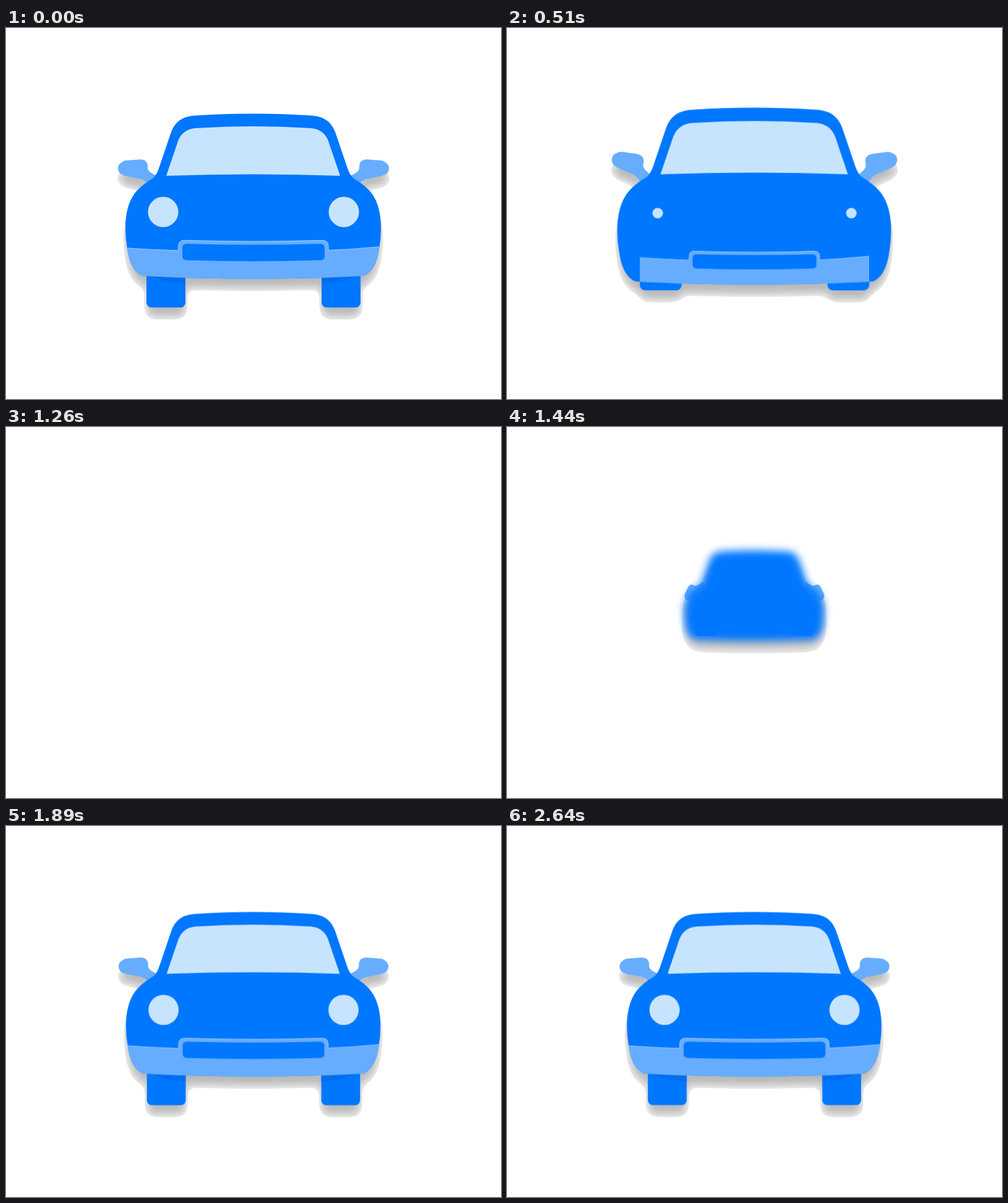
Recreate the animation shown at these times as an HTML page. Size 800 by 600 pixels, loop 2670 ms.

```html
<!DOCTYPE html>
<html lang="en">
<head>
<meta charset="utf-8">
<title>Car</title>
<style>
  html, body { margin: 0; width: 100%; height: 100%; overflow: hidden; background: #fff; }
  svg { display: block; width: 800px; height: 600px; }
</style>
</head>
<body>
<svg viewBox="0 0 800 600">
  <defs>
    <path id="shell" d="M399.5 138.5Q352 138.5 307 141.5C287 142.5 274 150 267 168L247 227Q243 239 236 244Q219 254 209 266C197 282 193 301 193 325Q193 341 196 357C199 380 208 397 222 401Q300 405.5 399.5 405.5Q499 405.5 577 401C591 397 600 380 603 357Q606 341 606 325C606 301 602 282 590 266Q580 254 563 244Q556 239 552 227L532 168C525 150 512 142.5 492 141.5Q447 138.5 399.5 138.5Z"/>
    <path id="mirror" d="M186 218Q190 214 196 214L217 212.5Q229 213 229 224Q228 231 236 235L252 244L234 256L226 249Q219 243 211 243L192 239Q181 236 181 227Q181 221 186 218Z"/>
    <g id="wheel">
      <rect x="227" y="380" width="63" height="72" rx="8"/>
      <path d="M234 400Q252 412 290 413V400Z" fill="#006eed"/>
    </g>
    <clipPath id="inside"><use href="#shell"/></clipPath>
    <filter id="soft" filterUnits="userSpaceOnUse" x="0" y="0" width="800" height="600" color-interpolation-filters="sRGB">
      <feGaussianBlur id="softBlur" stdDeviation="0"/>
    </filter>
    <filter id="shadow" filterUnits="userSpaceOnUse" x="0" y="0" width="800" height="600" color-interpolation-filters="sRGB">
      <feGaussianBlur in="SourceAlpha" stdDeviation="8"/>
      <feOffset dy="16"/>
      <feComponentTransfer result="cast"><feFuncA id="cut" type="table"/></feComponentTransfer>
      <feMerge><feMergeNode in="cast"/><feMergeNode in="SourceGraphic"/></feMerge>
    </filter>
  </defs>

  <g id="car" filter="url(#shadow)">
    <g id="scaled">
      <g fill="#66adff">
        <use id="mirrorL" href="#mirror"/>
        <g transform="matrix(-1 0 0 1 800 0)"><use id="mirrorR" href="#mirror"/></g>
      </g>
      <g id="wheels" fill="#07f">
        <use href="#wheel"/>
        <use href="#wheel" transform="matrix(-1 0 0 1 800 0)"/>
      </g>
      <use id="body" href="#shell" fill="#07f"/>
      <g clip-path="url(#inside)">
        <g id="bumper">
          <path fill="#66adff" stroke="#8bc1ff" stroke-width="1.3" d="M188 355.5Q232 358.5 278.5 360V354Q279 343 289 343.5Q400 347 510 343.5Q521 343 521 354V359.5Q566 357.5 612 353V415H188Z"/>
          <path id="grille" fill="#07f" d="M285 356Q285 349 292 349Q400 352 508 349Q515 349 515 356V369Q515 375.5 508 375.5Q400 379 292 375.5Q285 375 285 369Z"/>
        </g>
      </g>
      <path id="glass" fill="#c7e4ff" d="M259 239L278 183Q285 164 306 162Q400 156 493 162Q514 164 521 183L540 239Q400 234 259 239Z"/>
      <circle id="lampL" cx="254" cy="297.5" fill="#c7e4ff"/>
      <circle id="lampR" cx="546" cy="297.5" fill="#c7e4ff"/>
    </g>
  </g>
</svg>
<script>
const LOOP = 2670, STEP = 30, CX = 399.5;
const ENTER = 1260, GONE = 840;
const TURN = 2070; // the exit is the entrance played backwards from here
const $ = id => document.getElementById(id);

// Spring from 0 to 1 with one overshoot: a cosine that dies out around `fade` ms.
function spring(t, delay = 0, fade = 312) {
  const u = Math.max(0, t - ENTER - delay);
  return 1 - Math.exp(-((u / fade) ** 4)) * Math.cos(.0058 * u);
}

// Spring with a stronger swing around 1, never below 0.
const pop = (t, delay, gain) => Math.max(0, 1 + gain * (spring(t, delay) - 1));

const place = (id, value) => $(id).setAttribute('transform', value);
const scaleAt = (x, y, sx, sy = sx) =>
  `translate(${x} ${y}) scale(${sx} ${sy}) translate(${-x} ${-y})`;

function grow(id, y, sx, sy = sx) {
  const visible = sy > .1;
  $(id).setAttribute('visibility', visible ? 'visible' : 'hidden');
  if (visible) place(id, scaleAt(CX, y, sx, sy));
}

function draw(time) {
  const leaving = time < GONE;
  const t = leaving ? TURN - time : time;
  const size = spring(t);
  const visible = size > .001 && (leaving || time >= ENTER);
  $('car').style.display = visible ? '' : 'none';
  if (!visible) return;

  place('scaled', scaleAt(CX, 273, size * (leaving ? 1 : .996)));
  const blur = Math.max(0, 25 * size * (1 - size));
  $('softBlur').setAttribute('stdDeviation', blur / size);
  if (blur > .05) $('body').setAttribute('filter', 'url(#soft)');
  else $('body').removeAttribute('filter');

  const swing = 130 * (spring(t, 0, 340) - 1);
  for (const id of ['mirrorL', 'mirrorR']) place(id, `rotate(${swing} 240 240)`);
  place('wheels', `translate(0 ${62 * (spring(t, 150) - 1)})`);

  const bumper = pop(t, 60, 1.5);
  const extra = Math.max(0, bumper - 1);
  grow('bumper', 405, Math.min(1, bumper), bumper);
  place('grille', `translate(0 ${-28 * extra}) ` + scaleAt(CX, 362, 1 + .57 * extra, 1));

  grow('glass', 239, pop(t, 28, 1.6));
  for (const id of ['lampL', 'lampR']) $(id).setAttribute('r', 24.5 * pop(t, 100, 2));
}

// Shadow: faint alpha is cut off, the rest is dimmed.
$('cut').setAttribute('tableValues',
  Array.from({ length: 21 }, (_, i) => i < 7 ? 0 : i / 20 * .28).join(' '));

let shown = -1;
function tick() {
  const time = Math.floor(performance.now() % LOOP / STEP) * STEP;
  if (time !== shown) draw(shown = time);
  requestAnimationFrame(tick);
}
tick();
</script>
</body>
</html>
```
